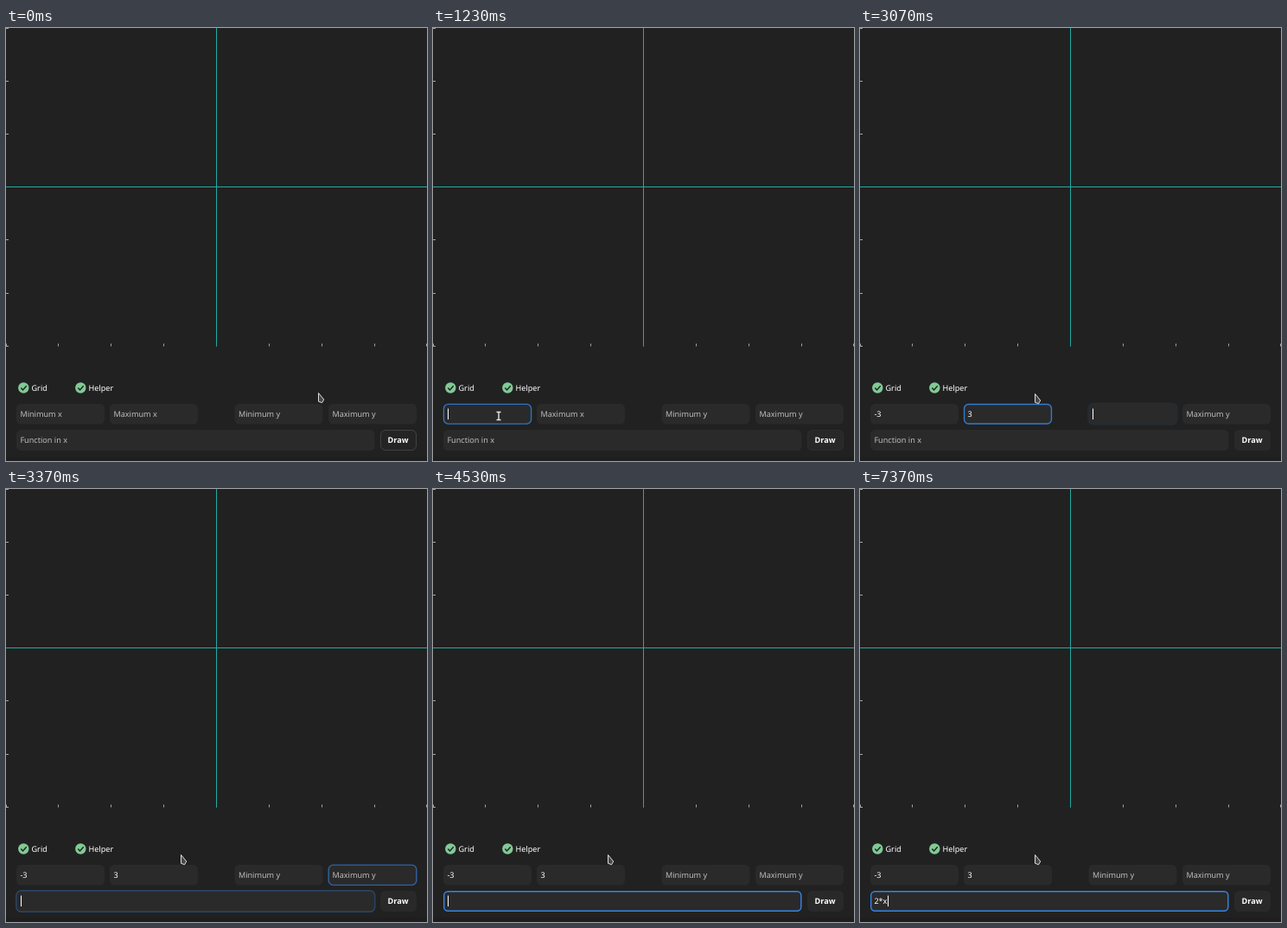
Animation, 487 px wide and 500 px high, one loop 8000 ms. Source, as an HTML page:

```html
<!DOCTYPE html>
<html lang="en">
<head>
<meta charset="utf-8">
<title>Function plotter</title>
<style>
  html, body { margin: 0; width: 100%; height: 100%; overflow: hidden; background: #212121; }
  svg { display: block; width: 487px; height: 500px; }
  text { font: 9.1px "Noto Sans", sans-serif; fill: #fff; white-space: pre; text-rendering: geometricPrecision; }
  .placeholder { fill: #bdbdbd; }
  .bold { font-weight: 700; text-anchor: middle; }
</style>
</head>
<body>
<svg id="stage" viewBox="0 0 487 500"></svg>
<script>
const LOOP = 8000, FADE = 200, BLINK = 1200;
const stage = document.getElementById('stage');

function add(tag, attrs, text = '') {
  const el = document.createElementNS('http://www.w3.org/2000/svg', tag);
  set(el, attrs);
  el.textContent = text;
  return stage.appendChild(el);
}
function set(el, attrs) {
  for (const key in attrs) el.setAttribute(key, attrs[key]);
}
const clamp = v => Math.max(0, Math.min(1, v));

// Plot area: ticks and axes
add('rect', { y: 495, width: 487, height: 5, fill: '#1e1e1e' });
let ticks = '';
for (let i = 0; i <= 6; i++) ticks += `M0 ${Math.round(i * 61.1) + .5}h3`;
for (let i = 0; i <= 8; i++) ticks += `M${Math.min(486.5, Math.floor(i * 60.9) + .5)} 364.5v3`;
add('path', { d: ticks, stroke: '#a8a8a8' });
add('path', { d: 'M0 183.5H487M243.5 0V367.5', stroke: '#22aaa4' });

// Check boxes
for (const [x, label] of [[20.3, 'Grid'], [86.3, 'Helper']]) {
  add('circle', { cx: x, cy: 415.5, r: 6.2, fill: '#81c995' });
  add('path', { d: `M${x - 3} 415.6l2.2 2.3 4.2-4.6`, fill: 'none', stroke: '#202020', 'stroke-width': 1.4 });
  add('text', { x: x + 9.2, y: 419 }, label);
}

// Entries; keys holds [time, text] for everything typed
const entries = [
  { x: 12, y: 434, w: 102, h: 23.5, hint: 'Minimum x', focus: 1070, blur: 2570, keys: [[2200, '-'], [2430, '-3']] },
  { x: 120, y: 434, w: 102, h: 23.5, hint: 'Maximum x', focus: 2570, blur: 3050, keys: [[2970, '3']] },
  { x: 264.5, y: 434, w: 102, h: 23.5, hint: 'Minimum y', focus: 3050, blur: 3170, keys: [] },
  { x: 373, y: 434, w: 102, h: 23.5, hint: 'Maximum y', focus: 3170, blur: 3300, keys: [] },
  { x: 12, y: 464, w: 414.5, h: 24, hint: 'Function in x', focus: 3300, blur: Infinity,
    keys: [[6620, '2'], [7000, '2*'], [7370, '2*x']] }
];
for (const e of entries) {
  add('rect', { x: e.x, y: e.y, width: e.w, height: e.h, rx: 5.5, fill: '#2a2a2a' });
  e.label = add('text', { x: e.x + 4.4, y: e.y + 15.2 });
  e.ring = add('rect', { fill: 'none', stroke: '#3584e4', 'stroke-width': 1.4 });
}

// Draw button
add('rect', { x: 433, y: 464, width: 42, height: 24, rx: 5.5, fill: '#292929' });
const buttonRing = add('rect', { x: 433.5, y: 464.5, width: 41, height: 23, rx: 5.5, fill: '#242424', stroke: '#414141' });
add('text', { x: 453.6, y: 479.2, class: 'bold' }, 'Draw');

const caret = add('rect', { width: 1, height: 12.5, fill: '#fff' });
const arrow = add('path', { d: 'M.5.5V10.3L4.6 11.7 6.7 8Z', fill: '#484848', stroke: '#dedede', 'stroke-linejoin': 'round' });
const beam = add('path', { d: 'M-2.5-4.5H2.5M0-4.5V4.5M-2.5 4.5H2.5', stroke: '#e4e4e4', 'stroke-width': 1.4 });

// Pointer way points: time, x, y
const path = [
  [0, 361, 421], [500, 361, 421], [770, 132, 474], [1000, 76, 448],
  [1370, 76, 448], [1480, 130, 411], [1600, 202, 422], [LOOP, 202, 422]
];
function pointerAt(t) {
  const i = path.findIndex(p => p[0] > t);
  const [t0, x0, y0] = path[i - 1], [t1, x1, y1] = path[i];
  const k = (t - t0) / (t1 - t0);
  return [x0 + (x1 - x0) * k, y0 + (y1 - y0) * k];
}

function blink(age) {
  return 1 - clamp((age % BLINK - 800) / 100);
}

function render(t) {
  caret.setAttribute('opacity', 0);
  for (const e of entries) {
    const focused = t >= e.focus && t < e.blur;
    const key = e.keys.filter(k => k[0] <= t).pop();
    e.label.textContent = key ? key[1] : focused ? '' : e.hint;
    e.label.setAttribute('class', key ? '' : 'placeholder');

    const glow = clamp((t - e.focus) / FADE) * (1 - clamp((t - e.blur) / FADE));
    const inset = .7 - 1.5 * (1 - glow);
    set(e.ring, {
      x: e.x + inset, y: e.y + inset, width: e.w - 2 * inset, height: e.h - 2 * inset,
      rx: 5.5 - inset, opacity: glow
    });

    if (focused) {
      const width = key ? e.label.getComputedTextLength() : 0;
      set(caret, {
        x: Math.round(e.x + 4.6 + width), y: e.y + 5.5,
        opacity: blink(t - (key ? key[0] : e.focus))
      });
    }
  }
  buttonRing.setAttribute('opacity', 1 - clamp((t - entries[0].focus) / FADE));

  const [x, y] = pointerAt(t);
  const typing = entries.some(e => x > e.x && x < e.x + e.w && y > e.y && y < e.y + e.h);
  set(arrow, { transform: `translate(${x} ${y})`, opacity: typing ? 0 : 1 });
  set(beam, { transform: `translate(${x} ${y})`, opacity: typing ? 1 : 0 });
}

function frame() {
  render(performance.now() % LOOP);
  requestAnimationFrame(frame);
}
frame();
</script>
</body>
</html>
```
